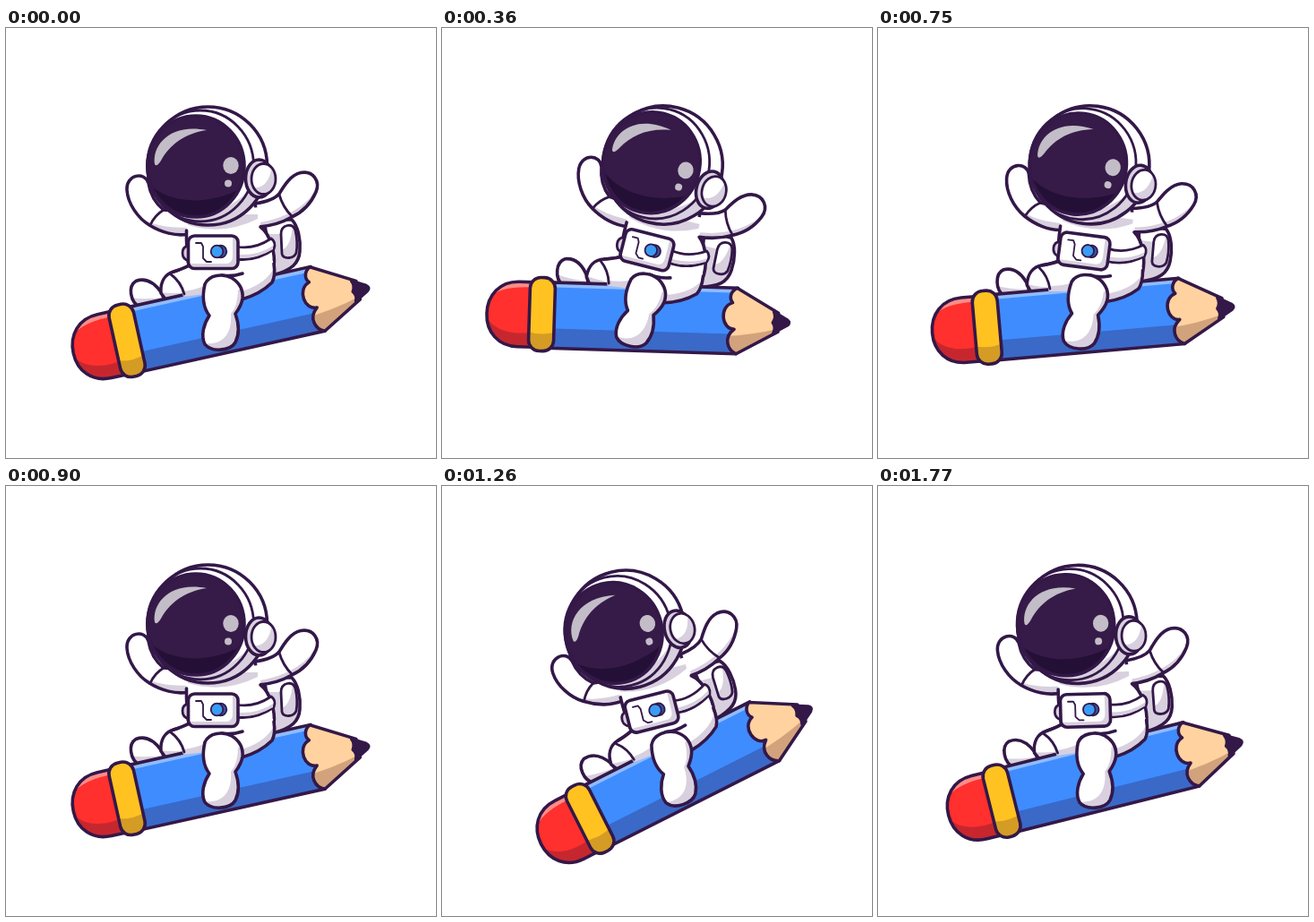
An HTML page for the animation above (1800 ms loop, 480 by 480 pixels).

```html
<!DOCTYPE html>
<html lang="en">
<head>
<meta charset="utf-8">
<title>Astronaut riding a pencil</title>
<style>
  html, body { margin: 0; width: 100%; height: 100%; overflow: hidden; background: #fff; }
  svg { display: block; width: 100vw; height: 100vh; }
  .line { stroke: #331848; stroke-width: 3.6; stroke-linecap: round; stroke-linejoin: round; }
  .thin { stroke-width: 2.8; }
  .fine { stroke-width: 1.8; }
  .none { fill: none; }
  .suit { fill: #fff; }
  .shade { fill: #d8d0de; }
  .dark { fill: #331848; }
  .glint { fill: #c2bdc7; }
</style>
</head>
<body>
<svg viewBox="0 0 480 480" xmlns="http://www.w3.org/2000/svg">
  <defs>
    <path id="eraser" d="M106 288H88C66 288 52.500 304 52.500 324.500S66 360.500 88 360.500H106Z"/>
    <rect id="band" x="100" y="282.500" width="28" height="82" rx="12"/>
    <rect id="body" x="120" y="287.500" width="212" height="73.500"/>
    <path id="wood" d="M331 287.500L378 314V335L332 361C322 357 317 343 329 333.500C315 334 311 309 326.500 304C322 299 324 291 331 287.500Z"/>
    <path id="armL" d="M204 230C190 233 173 228 160 220C147 212 136 196 135 181C134 163 155 160 159 173C161 186 166 195 176 203L206 206Z"/>
    <path id="armR" d="M278 196C291 194 300 191 305 185C311 175 318 164 329 161.500C343 159 351 171 346 183C340 197 330 206 319 211C307 218 296 221 282 222Z"/>
    <path id="torso" d="M200 206L203 265C212 285 232 300 262 303C278 300 292 291 298 284C302 265 299 240 284 222V200Z"/>
    <path id="leg" d="M264 302C263 309 259 315 256 319C260 330 261 341 256 351C250 361 229 362 222 353C217 343 221 330 227 321C220 312 219 299 222 286C227 275 242 274 252 279C260 284 265 292 264 302Z"/>
    <path id="boot" d="M150 312C138 306 136 288 145 282.500C157 278 167 286 174 296L180 312Z"/>
    <path id="thigh" d="M206 264C200 268 193 270 187 272C177 275 172 284 173 296L182 308L232 304L234 270Z"/>
    <path id="pack" d="M288 214H319C326 221 329 236 328 249C327 263 319 270 298 276Z"/>
    <path id="pocket" d="M307 230Q307 222 314 220.500Q321 219 323 226Q326 239 324 251Q322 256 316 256.500Q309 257 308 252Z"/>
    <ellipse id="shell" cx="225.500" cy="154" rx="66" ry="66"/>
    <ellipse id="visor" cx="212" cy="154.500" rx="54" ry="56.500"/>
    <ellipse id="phone" cx="287.500" cy="168.500" rx="13.500" ry="17"/>
    <rect id="box" x="203.500" y="232" width="55.500" height="36.500" rx="7"/>
  </defs>

  <g id="rider">
    <g data-part="pack" fill="#fff"><path class="shade" d="M288 230H308L309 256Q322 260 329 240L340 285H288Z"/></g>
    <g data-part="pocket" data-line="thin" fill="#fff"><path class="shade" d="M300 248Q319 252 320 216H335V262H300Z"/></g>

    <g data-part="boot" fill="#fff"><path class="shade" d="M130 299Q153 306 190 298V320H130Z"/></g>
    <g data-part="thigh" fill="#fff"><path class="shade" d="M165 294Q200 300 230 288V320H165Z"/></g>

    <g data-part="armL" fill="#fff"><path class="shade" d="M130 190C143 214 168 226 212 222V245H130Z"/></g>
    <path class="line thin none" d="M161 220Q166 209 176 203"/>
    <g data-part="armR" fill="#fff"><path class="shade" d="M275 218C306 215 335 202 349 176V230H275Z"/></g>
    <path class="line thin none" d="M305 186Q309 200 319 210"/>

    <use href="#torso" class="suit"/>
    <path class="shade" d="M203 208H281V213Q243 232 203 220Z"/>
    <path class="line none" d="M201.500 226Q201 247 204 265M284 222C295 230 301 252 299 266"/>

    <g transform="rotate(-12.5 240 240)">
      <g data-part="body" fill="#3f8cff">
        <path fill="#8fbcff" d="M120 285H334V293H120Z"/>
        <path fill="#3a69c8" d="M120 339H334V364H120Z"/>
      </g>
      <g data-part="wood" fill="#ffd29f"><path fill="#d2a27c" d="M310 342Q345 341 380 331V370H310Z"/></g>
      <path class="line dark" d="M373 313L388 321.500Q392 324.500 388 327.500L373 336Q376 330 372 325Q376 319 373 313Z"/>
      <g data-part="eraser" fill="#ff302d">
        <path fill="#ff8c88" d="M56 306Q68 292 110 294V282H56Z"/>
        <path fill="#c6272f" d="M48 322C60 346 84 348 110 343V370H48Z"/>
      </g>
      <g data-part="band" fill="#ffc221"><path fill="#d49c24" d="M95 342Q114 349 132 342V370H95Z"/></g>
    </g>

    <!-- near thigh overlaps the pencil -->
    <path class="suit" d="M206 260H298L298 284Q285 296 263 303L220 296Z"/>
    <path class="shade" d="M259 295Q287 288 298 270V284Q285 297 263 303Z"/>
    <path class="line none" d="M299 263Q301 277 297 284Q284 297 263 303"/>
    <path class="suit" d="M204 264L230 275L221 297L198 298L188 276Z"/>
    <path class="shade" d="M196 294Q210 293 221 288V297L198 300Z"/>
    <path class="line none" d="M205 265Q195 270 187 272M264 274Q252 278 241 276"/>
    <path class="line thin none" d="M184 275Q195 283 199 297"/>

    <g data-part="leg" fill="#fff">
      <path class="shade" d="M212 350C238 358 253 345 251 319Q259 310 259 292L272 290V370H212Z"/>
    </g>

    <path class="line thin suit" d="M257 244C272 247 284 243 296 235Q302 239 299 247C286 256 272 260 257 258Z"/>
    <path class="shade" d="M259 253Q282 254 298 243V247Q280 258 259 257Z"/>
    <path class="line thin shade" d="M204 243Q197 244 197 251Q197 258 204 260Z"/>
    <g data-part="box" fill="#fff"><path class="shade" d="M200 263H247Q253 262 253 254V229H265V275H200Z"/></g>
    <path class="line fine none" d="M212 240H218L220 244V257L224 261H229"/>
    <circle class="line fine" cx="239.500" cy="249.500" r="6.800" fill="#3455a8"/>
    <circle class="line fine" cx="235.500" cy="249.500" r="6.800" fill="#3b9cf5"/>

    <g data-part="shell" fill="#fff"><path class="shade" d="M180 213Q255 214 286 162L300 165V230H180Z"/></g>
    <ellipse class="line thin none" cx="217" cy="154" rx="59.500" ry="62"/>
    <g data-part="visor" fill="#361b49">
      <path fill="#241036" d="M150 164C174 197 225 203 274 173V222H150Z"/>
    </g>
    <path class="glint" d="M166 152C163 130 184 106 224 114C199 118 183 130 173 148Q168 156 166 152Z"/>
    <ellipse class="glint" cx="251" cy="153.500" rx="8.700" ry="9.500"/>
    <circle class="glint" cx="248" cy="173.500" r="4"/>

    <ellipse class="line shade" cx="282.500" cy="168" rx="15" ry="21"/>
    <g data-part="phone" data-line="thin" fill="#fff"><path class="shade" d="M272 178Q294 182 297 152H305V190H272Z"/></g>
  </g>
</svg>
<script>
  const NS = "http://www.w3.org/2000/svg";
  const LOOP = 1800, STEP = 30, SWING = 15;

  function make(tag, attrs) {
    const node = document.createElementNS(NS, tag);
    for (const key in attrs) node.setAttribute(key, attrs[key]);
    return node;
  }

  // Each part: flat fill, shading clipped to its shape, outline on top.
  const defs = document.querySelector("defs");
  for (const group of document.querySelectorAll("[data-part]")) {
    const { part, line = "" } = group.dataset, href = "#" + part;
    const clip = make("clipPath", { id: part + "Clip" });
    clip.append(make("use", { href }));
    defs.append(clip);
    const shading = make("g", { "clip-path": `url(#${part}Clip)` });
    shading.append(...group.children);
    group.append(make("use", { href }), shading,
      make("use", { href, class: `line none ${line}` }));
  }

  const rider = document.getElementById("rider");

  function draw(ms) {
    const time = Math.floor((ms % LOOP) / STEP) * STEP;
    const angle = SWING * Math.sin(2 * Math.PI * time / LOOP);
    rider.setAttribute("transform", `rotate(${angle.toFixed(3)} 240 240)`);
  }

  const start = performance.now();
  function tick() {
    draw(performance.now() - start);
    requestAnimationFrame(tick);
  }
  tick();
</script>
</body>
</html>
```
